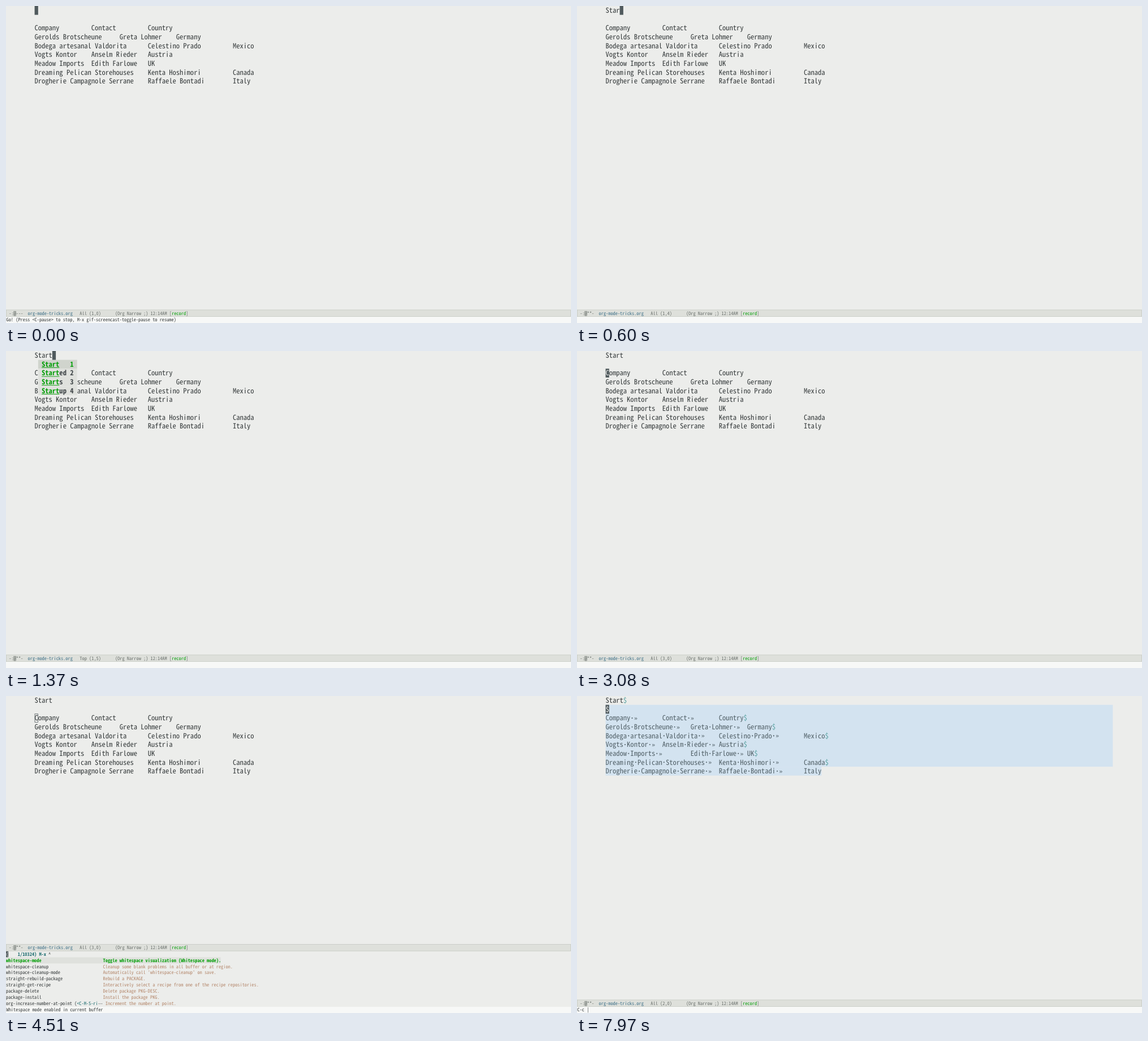
These frames come from a looping animation (999 by 561 pixels, 8000 ms). An HTML page:

```html
<!DOCTYPE html>
<html lang="en">
<head>
<meta charset="utf-8">
<title>Whitespace mode</title>
<style>
  html, body { margin: 0; width: 100%; height: 100%; overflow: hidden; background: #ecedeb; }
  svg { display: block; width: 100vw; height: 100vh; }
  text { white-space: pre; text-rendering: geometricPrecision; font-variant-ligatures: none;
         font-family: "Noto Sans Mono CJK JP", "Noto Sans Mono", "DejaVu Sans Mono", monospace; }
  text.mark { font-family: "DejaVu Sans Mono", monospace; }
</style>
</head>
<body>
<svg id="stage" viewBox="0 0 1916 1076" preserveAspectRatio="none"></svg>
<script>
const stage = document.getElementById('stage');
const LOOP = 8000, W = 1916, LEFT = 97, RIGHT = 1817;
const CELL = 12, ROW = 30;      // buffer grid
const CHAR = 8, LINE = 21;      // mode line and echo area grid
const ECHO_Y = 1055, BAR_H = 24, LIST_ROWS = 9;

const C = {
  bg: '#ecedeb', echo: '#f7f8f7', bar: '#dee0db', barEdge: '#c6cac4', barText: '#6a706c',
  ink: '#353a3b', cursor: '#505a5d', green: '#08a00c', file: '#3f7189',
  popup: '#dfe1dd', picked: '#d0d4cd', popupText: '#41474a',
  teal: '#5ba3a3', prompt: '#1b6b6e',
  note: '#b4876b', tab: '#ba803b', tabMark: '#f0e4d2', space: '#5b686b', dot: '#39474b',
  region: '#d3e3f0', regionText: '#526168'
};

const table = [
  '',
  'Company \tContact \tCountry',
  'Gerolds Brotscheune \tGreta Lohmer \tGermany',
  'Bodega artesanal Valdorita \tCelestino Prado \tMexico',
  'Vogts Kontor \tAnselm Rieder \tAustria',
  'Meadow Imports \tEdith Farlowe \tUK',
  'Dreaming Pelican Storehouses \tKenta Hoshimori \tCanada',
  'Drogherie Campagnole Serrane \tRaffaele Bontadi \tItaly'
];

const commands = [
  ['whitespace-mode', 'Toggle whitespace visualization (Whitespace mode).'],
  ['whitespace-cleanup', 'Cleanup some blank problems in all buffer or at region.'],
  ['whitespace-cleanup-mode', "Automatically call 'whitespace-cleanup' on save."],
  ['straight-rebuild-package', 'Rebuild a PACKAGE.'],
  ['straight-get-recipe', 'Interactively select a recipe from one of the recipe repositories.'],
  ['package-delete', 'Delete package PKG-DESC.'],
  ['package-install', 'Install the package PKG.'],
  ['org-increase-number-at-point (', 'Increment the number at point.']
];

const goText = 'Go! (Press <C-pause> to stop, M-x gif-screencast-toggle-pause to resume)';
const enabled = 'Whitespace mode enabled in current buffer';
const scenes = [
  { at: 0, typed: '', row: 0, col: 0, echo: goText, clean: true },
  { at: 240, typed: 'S', row: 0, col: 1 },
  { at: 330, typed: 'St', row: 0, col: 2 },
  { at: 420, typed: 'Sta', row: 0, col: 3 },
  { at: 600, typed: 'Star', row: 0, col: 4 },
  { at: 1370, typed: 'Start', row: 0, col: 5, menu: true },
  { at: 2280, typed: 'Start', row: 0, col: 5 },
  { at: 3080, typed: 'Start', row: 2, col: 0 },
  { at: 4510, typed: 'Start', row: 2, col: 0, list: true, echo: enabled },
  { at: 6300, typed: 'Start', row: 2, col: 0, marks: true, echo: enabled },
  { at: 7970, typed: 'Start', row: 1, col: 0, marks: true, region: true, echo: 'C-c |' }
];

// Font sizes follow from the advance the font really has.
const pen = document.createElement('canvas').getContext('2d');
pen.font = '100px "Noto Sans Mono CJK JP", "Noto Sans Mono", "DejaVu Sans Mono", monospace';
const advance = pen.measureText('0').width / 100;
const bigSize = CELL / advance, smallSize = CHAR / advance;

const esc = s => s.replace(/&/g, '&amp;').replace(/</g, '&lt;');
const rect = (x, y, w, h, fill, extra = '') =>
  `<rect x="${x}" y="${y}" width="${w}" height="${h}" fill="${fill}" ${extra}/>`;
const label = (x, y, s, fill, size, extra = '') =>
  `<text x="${x}" y="${y}" fill="${fill}" font-size="${size}" ${extra}>${esc(s)}</text>`;
const weight = bold => bold ? 'font-weight="700"' : '';

const colX = col => LEFT + col * CELL;
const big = (row, col, s, fill = C.ink, bold = false) =>
  label(colX(col), row * ROW + 23.4, s, fill, bigSize, weight(bold));
const cells = (row, col, n, fill) => rect(colX(col), row * ROW, n * CELL, ROW, fill);
const small = (x, top, s, fill = C.ink, bold = false) =>
  label(x, top + 15.6, s, fill, smallSize, weight(bold));
const dot = (x, y, r, fill) => `<circle cx="${x}" cy="${y}" r="${r}" fill="${fill}"/>`;
const nextStop = col => (Math.floor(col / 8) + 1) * 8;

function bufferLine(s, row, line, last) {
  const ink = s.region && row > 0 ? C.regionText : C.ink;
  let out = '', col = 0;
  for (const part of line.match(/\t| |[^\t ]+/g) || []) {
    if (part === '\t') {
      // The visible mark takes one cell before the tab itself.
      const end = nextStop(s.marks ? col + 1 : col);
      if (s.marks) {
        if (!s.region) out += cells(row, col, end - col, C.tab);
        out += label(colX(col), row * ROW + 22.5, '»', s.region ? ink : C.tabMark, 20, 'class="mark"');
      }
      col = end;
    } else if (part === ' ') {
      if (s.marks) {
        if (!s.region) out += cells(row, col, 1, C.space);
        out += dot(colX(col) + 6, row * ROW + 15, 2, s.region ? ink : C.dot);
      }
      col++;
    } else {
      out += big(row, col, part, ink);
      col += part.length;
    }
  }
  if (s.marks && !last) out += big(row, col, '$', C.teal);
  return out;
}

function region() {
  return rect(LEFT, ROW, RIGHT - LEFT, 7 * ROW, C.region) + cells(8, 0, 61, C.region);
}

function cursor(s, lines) {
  const x = colX(s.col), y = s.row * ROW;
  if (s.list) return rect(x + .75, y + .75, CELL - 1.5, ROW - 1.5, 'none', `stroke="${C.cursor}" stroke-width="1.5"`);
  const under = lines[s.row][s.col] || (s.marks ? '$' : '');
  return cells(s.row, s.col, 1, C.cursor) + big(s.row, s.col, under, C.bg);
}

function popup() {
  return ['', 'ed', 's', 'up'].map((tail, i) => {
    const row = i + 1;
    return cells(row, 1, 11, i ? C.popup : C.picked)
      + big(row, 2, 'Start', C.green, true)
      + rect(colX(2), row * ROW + 25.5, 5 * CELL, 1.8, C.green)
      + big(row, 7, tail, C.popupText, true)
      + big(row, 10, String(row), i ? C.popupText : C.green, true);
  }).join('');
}

function modeLine(s, y) {
  const put = (col, str, fill = C.barText) => small(2 + col * CHAR, y + 2, str, fill);
  const where = `${s.menu ? 'Top' : 'All'} (${s.row + 1},${s.col})`;
  return rect(0, y, W, BAR_H, C.bar)
    + rect(.75, y + .75, W - 1.5, BAR_H - 1.5, 'none', `stroke="${C.barEdge}" stroke-width="1.5"`)
    + put(1, '-:')
    + rect(26.5, y + 5, 7, 15, '#c5c9c3', `stroke="${C.barText}"`)
    + put(3, '@')
    + put(4, s.clean ? '---' : '**-')
    + put(9, 'org-mode-tricks.org', C.file)
    + put(31, where)
    + put(46, '(Org Narrow ;) 12:14AM')
    + put(69, '[') + put(70, 'record', C.green) + put(76, ']');
}

function commandList(top) {
  let out = rect(0, top, W, LIST_ROWS * LINE, C.bg)
    + rect(0, top, CHAR, LINE, C.cursor) + small(0, top, '(', C.bg)
    + small(5 * CHAR, top, '1/10324) M-x', C.prompt, true)
    + small(18 * CHAR, top, '^');
  commands.forEach(([name, note], i) => {
    const y = top + (i + 1) * LINE, first = i === 0, last = i === commands.length - 1;
    if (first) out += rect(0, y, 91 * CHAR, LINE, C.popup);
    out += small(0, y, name, first ? C.green : C.ink, first)
      + small((last ? 42 : 41) * CHAR + 1, y, note, first ? C.green : C.note, first);
    if (last) {
      out += small(30 * CHAR, y, '<C-M-S-ri', C.prompt);
      for (let k = 0; k < 3; k++) out += dot(39 * CHAR + 3 + k * 5, y + 10.5, 1.1, C.ink);
    }
  });
  return out;
}

function draw(s) {
  const lines = [s.typed, ...table];
  const listTop = ECHO_Y - (s.list ? LIST_ROWS * LINE : 0);
  stage.innerHTML = rect(0, 0, W, 1076, C.bg)
    + (s.region ? region() : '')
    + lines.map((line, row) => bufferLine(s, row, line, row === lines.length - 1)).join('')
    + (s.menu ? popup() : '')
    + cursor(s, lines)
    + (s.list ? commandList(listTop) : '')
    + modeLine(s, listTop - BAR_H)
    + rect(0, ECHO_Y, W, LINE, C.echo)
    + small(1, ECHO_Y, s.echo || '');
}

const start = performance.now();
let shown = null;
function tick() {
  const t = (performance.now() - start) % LOOP;
  const scene = scenes.filter(s => s.at <= t).pop();
  if (scene !== shown) draw(shown = scene);
  requestAnimationFrame(tick);
}
tick();
</script>
</body>
</html>
```
